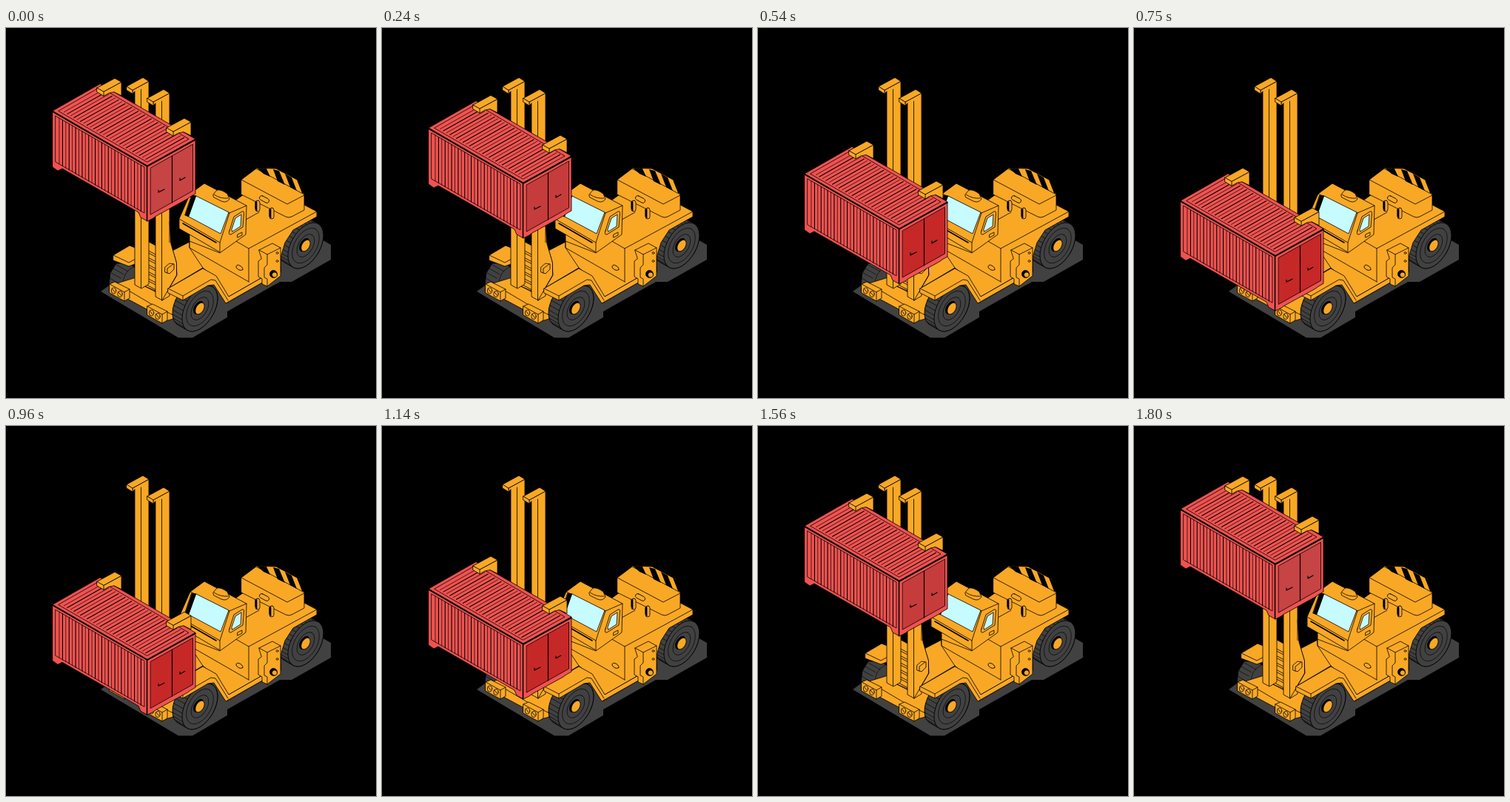
An HTML page that plays this animation: 500x500 px, repeating every 1.83 s.

```html
<!DOCTYPE html>
<html lang="en">
<head>
<meta charset="utf-8">
<title>Container handler</title>
<style>
html, body { margin: 0; width: 100%; height: 100%; overflow: hidden; background: #000; }
svg { display: block; width: 100vw; height: 100vh; }
.ink { stroke: #000; stroke-width: .8; stroke-linejoin: round; stroke-linecap: round; }
.o { fill: #f9a825; }
.g { fill: #414141; }
.r { fill: #ef5350; }
.k { fill: #000; }
.w { fill: #c6fbff; }
.n { fill: none; }
</style>
</head>
<body>
<svg viewBox="0 0 500 500">
  <defs>
    <g id="wheel">
      <path class="g" d="M-34 0V-15A34 19.6 0 0 1 34-15V0A34 19.6 0 0 1-34 0Z"/>
      <path id="tread" class="n" stroke-width=".6"/>
      <ellipse class="g" rx="34" ry="19.6"/>
      <ellipse class="n" rx="26" ry="15" stroke-width=".6"/>
      <ellipse class="n" rx="17" ry="9.8" stroke-width=".6"/>
      <ellipse class="k" cy="-2" rx="9.5" ry="5.5"/>
      <ellipse class="o" rx="8.6" ry="5.2"/>
    </g>
    <g id="mast">
      <path class="o" d="M174 86V347L183 352L193 346V72L171 84V89Z"/>
      <path class="o" d="M163 79L185 67L193 72L171 84Z"/>
      <path class="o" d="M163 79L171 84V89L163 84Z"/>
      <path class="n" d="M182.500 83V351"/>
    </g>
    <g id="lamp">
      <path class="o" d="M140 346L147 343L167 353V365L160 369L140 358Z"/>
      <path class="n" d="M140 346L160 357L167 353M160 357V369"/>
      <ellipse class="o" cx="145.500" cy="355" rx="3.200" ry="4"/>
      <ellipse class="o" cx="154" cy="359.500" rx="3.200" ry="4"/>
      <path class="n" d="M144 353l3 4M152.500 357.500l3 4"/>
    </g>
    <g id="fork">
      <path class="o" d="M132 86L156 73V91.500L146 86.500L139 88L132 92Z"/>
      <path class="o" d="M123 81L147 68L156 73L132 86Z"/>
      <path class="o" d="M123 81L132 86V92L123 86.500Z"/>
    </g>
  </defs>

  <rect width="500" height="500"/>
  <path class="g" d="M128 356L142 346L250 300L425 285L439 293V313L386 343H370L299 383V391L252 418.500H233Z"/>

  <g class="ink">
    <!-- wheels behind the chassis -->
    <path class="g" d="M139 347L141 331L149 318H166L176 325V352L160 348Z"/>
    <path class="n" stroke-width=".6" d="M142 331l13 7M145 325l14 8M149 320l16 9M140 338l12 7M158 349Q157 330 172 323"/>
    <use href="#wheel" transform="translate(405 294) rotate(-60)"/>

    <!-- front deck and bumper -->
    <path class="o" d="M145 307L167 294L177 298V318L166 322L145 314Z"/>
    <path class="n" d="M145 307L166 317L177 311"/>
    <path class="o" d="M150 345L176 337L234 362L226 378V393L216 396L192 381L164 366Z"/>
    <path class="n" d="M166 355L198 374M218 384L226 388"/>
    <path class="o" d="M221 303L250 288L330 298V346L300 363L283 334L266 324L219 352L205 362L193 340Z"/>

    <!-- rear body -->
    <path class="o" d="M248 284L300 240L338 213L403 239L420 248V255L388 273L377 290L371 310V330L298 372L285 340L266 324L248 297Z"/>
    <path class="n" d="M300 282L328 298L420 248M328 298V343M248 288V297L328 343M301 363L371 323M324 259L342 249"/>

    <!-- ladder and masts -->
    <path class="o" d="M183 294L193 289L204 295V356L183 347Z"/>
    <path id="rungs" class="n"/>
    <use href="#mast"/>
    <path class="o" d="M211 262L221 258L223 292L230 317L231 334L211 368Z"/>
    <use href="#mast" x="28" y="16"/>
    <path class="o" stroke="none" d="M212 290H222.500L230 317V334L212 366Z"/>
    <path class="n" d="M221 262L223 292L230.500 317V334L211 368"/>
    <path class="o" d="M215 323L221 318L227 319V326L221 332L215 330Z"/>
    <path class="n" d="M218 331V325L226 319"/>

    <!-- near wheel, fender and lamps -->
    <use href="#lamp"/>
    <use href="#lamp" x="51" y="30"/>
    <use href="#wheel" transform="translate(262 379) rotate(-60)"/>
    <path class="o" d="M219 352L266 325L284 335L301 363L371 323V330L297 372L281 347L273 348L239 368L219 358Z"/>
    <path class="n" d="M219 352L239 362L277 340L283 341L300 368M239 362V368"/>
    <ellipse class="o" cx="315.500" cy="324" rx="5" ry="2.800" transform="rotate(30 315.500 324)"/>

    <!-- side tank -->
    <path class="o" d="M342 300L360 291L371 297V335L353 349L346 346V339L341 336V315L345 312Z"/>
    <path class="n" d="M342 300L353 306L371 297M353 306V320L349 324V337L353 339V349"/>
    <circle class="k" cx="361.500" cy="332.500" r="5"/>
    <circle class="o" cx="363" cy="333.500" r="3.600"/>
    <circle class="o" cx="366.500" cy="304" r="1.400"/>
    <circle class="o" cx="366.500" cy="315" r="1.400"/>

    <!-- counterweight -->
    <path class="o" d="M337 189L365 190L397 207L403 225L385 232Z"/>
    <path class="o" d="M318 205L338 190L403 225V246L386 255Q382 257 378 255L318 225Z"/>
    <path class="k" stroke="none" d="M339 189L352 190L357 201L348 197ZM361 191L369 193L377 212L367 207ZM377 197L386 202L393 220L384 215ZM393 205L397 207L403 224L400 223Z"/>
    <path class="n" d="M318 205L380 238L403 226"/>
    <rect class="o" x="342" y="228.500" width="14" height="6" rx="3" transform="rotate(28 349 231.500)"/>
    <rect class="o" x="337" y="233" width="6" height="15" rx="3"/>
    <rect class="o" x="356" y="243" width="6" height="15" rx="3"/>
    <path class="k" d="M337 235v9l2 3v-12zM356 245v9l2 3v-12z"/>

    <!-- cab -->
    <path class="o" d="M249 224L268 210L325 240L324 279L289 304L248 288V279L234 271V258Z"/>
    <path class="n" d="M249 224L302 250L325 240M302 250L289 290V303M234 258L289 290M248 279L289 303"/>
    <path class="k" d="M251 226L257 227L247 255L242 253Z"/>
    <path class="w" d="M257 227L301 249L290 278L247 255Z"/>
    <path class="n" stroke-width="1.600" d="M239 264L284 290"/>
    <path class="o" d="M302 274L308 255L319 248Q322 247 321.500 251L320 269L304 279Q300 280 302 274Z"/>
    <path class="w" d="M305 272L310 257L318 252L317 268L306 275Z"/>
    <path class="o" d="M313 279L319 276V280L313 283Z"/>
    <path class="o" d="M280 225L285 219Q291 218 299 224L302 231Q298 237 291 234L281 229Z"/>
    <path class="n" d="M281 225Q290 231 300 230"/>

    <!-- moving load -->
    <g id="load">
      <path class="r" d="M63 112L127 75.500L256 150L191 186Z"/>
      <path class="r" d="M63 112L191 186V261L182 256L179 249L76 190L70 193L63 188Z"/>
      <path class="r" d="M191 186L256 150V224L249 228L245 231L203 254L199 257L191 261Z"/>
      <path class="n" d="M67 119L187 188V250L67 181ZM71 112L127 80L247 150L191 181Z"/>
      <path id="ribs" class="n" stroke-width=".7"/>
      <path id="grooves" class="n" stroke-width="1.100"/>
      <path id="doors" d="M195.500 189L252.500 157V220L195.500 252Z"/>
      <path class="n" stroke-width="1.200" d="M224.500 173V236M206 219v3l8-4M235 203v3l7-4"/>
      <path class="n" stroke-width="1.500" d="M63 113L191 187L256 151M190.500 187V260"/>
      <use href="#fork"/>
      <use href="#fork" x="94" y="54"/>
    </g>
  </g>
</svg>
<script>
const LOOP = 1830, HALF = 900, STEP = 30, DROP = 131;
const get = id => document.getElementById(id);
const draw = (id, d) => get(id).setAttribute('d', d);
const times = (n, f) => Array.from({ length: n }, (_, i) => f(i)).join('');

// Point on the container roof: s along the long side, t along the short one.
const roof = (s, t) => `${63 + 128 * s + 64.5 * t} ${112 + 74 * s - 36.5 * t}`;
const rib = s => {
  const x = 63 + 128 * s;
  return `M${x} ${119 + 0.578 * (x - 67)}v62M${roof(s, 0.1)}L${roof(s, 0.9)}`;
};
draw('ribs', times(13, i => rib(0.07 + i * 0.069)));
draw('grooves', times(13, i => rib(0.105 + i * 0.069)));
draw('rungs', times(6, i => `M183 ${296 + i * 9.5}l19 10M183 ${299 + i * 9.5}l19 10`));
draw('tread', times(15, i => {
  const a = Math.PI * (i + 0.5) / 15;
  return `M${34 * Math.cos(a)} ${-19.6 * Math.sin(a)}v-15`;
}));

function frame(now) {
  const t = Math.floor(((now + 1) % LOOP) / STEP) * STEP;
  const p = 1 - Math.abs(1 - t / HALF);
  const y = DROP * p * p * (3 - 2 * p);
  get('load').setAttribute('transform', `translate(0 ${y.toFixed(2)})`);
  // The doors are paler while the load is high.
  const c = Math.round(68 - 28 * Math.min(1, y / 85));
  get('doors').setAttribute('fill', `rgb(198 ${c} ${c})`);
  requestAnimationFrame(frame);
}
frame(performance.now());
</script>
</body>
</html>
```
